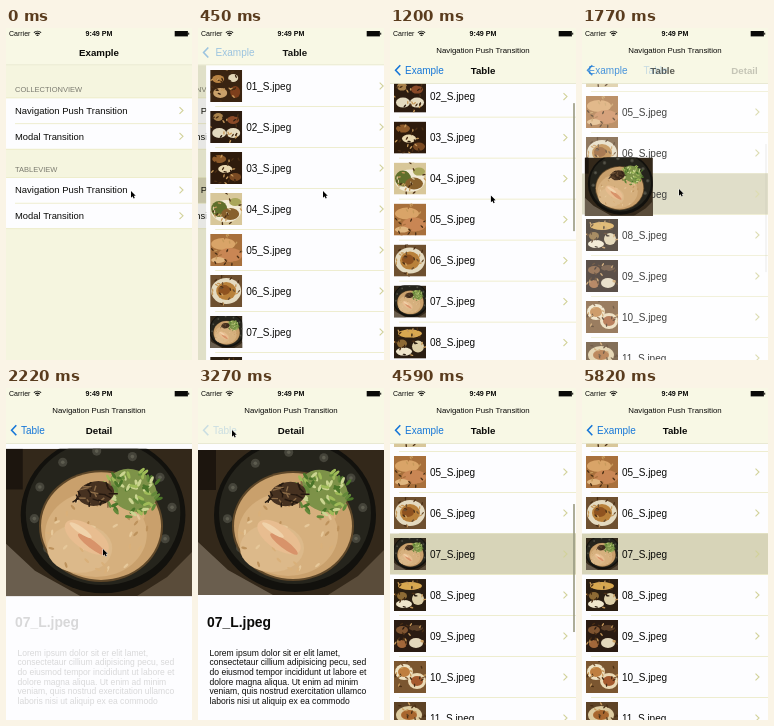
Animation of 186x332 px, one loop 5.85 s. Source, as an HTML page with a canvas:

```html
<!DOCTYPE html>
<html lang="en">
<head>
<meta charset="utf-8">
<title>Zoom transition</title>
<style>
html, body { margin: 0; width: 186px; height: 332px; overflow: hidden; background: #fdfdff; }
canvas { display: block; width: 186px; height: 332px; }
</style>
</head>
<body>
<canvas id="stage"></canvas>
<script>
const W = 186, H = 332, LOOP = 5850;
const canvas = document.getElementById('stage');
const g = canvas.getContext('2d');
const dpr = window.devicePixelRatio || 1;
canvas.width = Math.round(W * dpr);
canvas.height = Math.round(H * dpr);

const SANS = '"Liberation Sans", Arial, sans-serif';
const INK = '#0a0a08', BLUE = '#1677d8', PAPER = '#fdfdff';
const GROUP = '#f5f5df', BAR = '#f8f8e5', LINE = '#ebeac4', CHEVRON = '#d2d29a', SELECTED = '#d7d4b8';
const PITCH = 41, REST = -80;

const clamp = v => Math.max(0, Math.min(1, v));
const mix = (a, b, p) => a + (b - a) * p;
const part = (t, a, b) => clamp((t - a) / (b - a));
const smooth = p => p * p * (3 - 2 * p);
const easeOut = p => 1 - (1 - p) ** 3;

function rect(x, y, w, h, color) {
  g.fillStyle = color;
  g.fillRect(x, y, w, h);
}

function oval(x, y, rx, ry, color, turn = 0) {
  g.fillStyle = color;
  g.beginPath();
  g.ellipse(x, y, rx, ry, turn, 0, Math.PI * 2);
  g.fill();
}

function polygon(points, color) {
  g.fillStyle = color;
  g.beginPath();
  points.forEach(([x, y]) => g.lineTo(x, y));
  g.closePath();
  g.fill();
}

function path(points, color, width) {
  g.strokeStyle = color;
  g.lineWidth = width;
  g.beginPath();
  points.forEach(([x, y]) => g.lineTo(x, y));
  g.stroke();
}

// y is the middle of the capitals
function text(str, x, y, size, color = INK, align = 'left', weight = 'normal') {
  g.font = `${weight} ${size}px ${SANS}`;
  g.textAlign = align;
  g.fillStyle = color;
  g.fillText(str, x, y + size * 0.36);
}

function faded(alpha, draw) {
  if (alpha <= 0.003) return;
  g.save();
  g.globalAlpha *= alpha;
  draw();
  g.restore();
}

function clipped(x, y, w, h, draw) {
  g.save();
  g.beginPath();
  g.rect(x, y, w, h);
  g.clip();
  draw();
  g.restore();
}

function disclosure(y) {
  path([[173.5, y - 3.4], [177, y], [173.5, y + 3.4]], CHEVRON, 1.1);
}

function seeded(seed) {
  return () => (seed = (seed * 16807) % 2147483647) / 2147483647;
}

// ---- pictures ----

// small strokes strewn over an ellipse
function strew(rnd, count, x, y, rx, ry, size, colors) {
  for (let i = 0; i < count; i++) {
    const a = rnd() * 6.28, r = Math.sqrt(rnd());
    oval(x + Math.cos(a) * rx * r, y + Math.sin(a) * ry * r,
      size, size * 0.4, colors[i % colors.length], rnd() * 3);
  }
}

function ramenScene() {
  const rnd = seeded(71);
  rect(0, 0, 186, 145, '#33281a');
  polygon([[0, 92], [30, 120], [75, 145], [0, 145]], '#6a5e4e');
  polygon([[186, 100], [160, 126], [130, 145], [186, 145]], '#5a4c3a');
  rect(0, 0, 18, 40, '#1c150e');
  oval(97, 65, 81, 77, '#12110d');
  oval(97, 63, 76, 71, '#25241c');
  for (let i = 0; i < 9; i++) {
    const a = 2.5 + i * 0.53, x = 97 + Math.cos(a) * 68, y = 62 + Math.sin(a) * 60;
    oval(x, y, 4.5, 4.5, '#45443a');
    oval(x, y, 1.8, 1.8, '#5e5d50');
  }
  oval(95, 76, 61, 55, '#5e4729');
  oval(95, 76, 59, 53, '#c9a06c');
  oval(90, 84, 50, 42, '#d6b07e');
  oval(74, 98, 32, 24, '#dcb98a');
  strew(rnd, 34, 94, 84, 52, 40, 3, ['#e6c89a', '#bd925c', '#d9b07a']);
  oval(81, 87, 25, 12, '#e8bd90', 0.6);
  oval(86, 94, 17, 4, '#d8936a', 0.65);
  oval(75, 80, 13, 3, '#f0d2aa', 0.6);
  oval(126, 41, 25, 20, '#7d9248', 0.5);
  strew(rnd, 64, 126, 42, 28, 26, 3.8, ['#4b7529', '#9fbb58', '#cbd591', '#64893a']);
  oval(90, 44, 18, 12, '#463120', -0.15);
  for (let i = 0; i < 30; i++) {
    const x = 70 + rnd() * 34, y = 31 + rnd() * 25, a = rnd() * 3;
    path([[x, y], [x + Math.cos(a) * 9, y + Math.sin(a) * 5]], i % 3 ? '#24180f' : '#8a6a46', 1.4);
  }
}

function ramen(x, y, w, h) {
  const s = Math.max(w / 186, h / 145);
  clipped(x, y, w, h, () => {
    g.translate(x + w / 2, y + h / 2);
    g.scale(s, s);
    g.translate(-93, -72.5);
    ramenScene();
  });
}

// background, then x, y, rx, ry, colour of each blob
const dishes = {
  1: ['#3a2411', [8, 9, 6, 4, '#b98444'], [23, 8, 5, 4, '#e3d6b6'], [10, 23, 7, 5, '#c9a06a'], [25, 22, 5, 6, '#7e3f1c']],
  2: ['#2c1c10', [8, 6, 5, 4, '#a8824c'], [23, 9, 6, 4, '#8a4a28'], [9, 22, 7, 5, '#e3dac0'], [23, 22, 7, 5, '#e6dcc0']],
  3: ['#2e1b0c', [9, 7, 7, 4, '#8d5a2a'], [15, 17, 7, 4, '#ead9b0'], [25, 25, 6, 4, '#7a4a22']],
  4: ['#d8c79a', [16, 18, 15, 11, '#f2ebd6'], [9, 16, 8, 8, '#5f6f2c'], [20, 21, 9, 6, '#87602c'], [25, 9, 6, 4, '#a9a65a']],
  5: ['#a8703c', [13, 10, 12, 6, '#d9a468'], [20, 21, 12, 7, '#c98654'], [8, 26, 7, 3, '#e0b680']],
  6: ['#6e5030', [16, 16, 15, 13, '#e4dac0'], [16, 16, 10, 9, '#b9813a'], [14, 15, 6, 5, '#8f5320']],
  8: ['#2a1e12', [16, 7, 12, 4, '#d8a850'], [8, 17, 5, 4, '#8d6a35'], [10, 25, 8, 4, '#efe6cc'], [24, 20, 6, 6, '#ddcfa8']],
  9: ['#2a1b12', [8, 10, 6, 4, '#7f5430'], [22, 8, 7, 3, '#5d4028'], [22, 23, 7, 5, '#e4d8bc'], [8, 24, 5, 4, '#a2673a']],
  10: ['#7b5630', [10, 11, 9, 8, '#eee2c3'], [10, 11, 6, 5, '#bf7f3f'], [23, 20, 9, 8, '#ead9b4'], [23, 20, 6, 5, '#a55a2e']],
  11: ['#5e4326', [15, 13, 13, 9, '#ddcba0'], [15, 13, 8, 5, '#a9672f']]
};

function thumb(n, x, y) {
  if (n === 7) return ramen(x, y, 32, 32);
  const [back, ...blobs] = dishes[n];
  clipped(x, y, 32, 32, () => {
    rect(x, y, 32, 32, back);
    blobs.forEach(([bx, by, rx, ry, color]) => oval(x + bx, y + by, rx, ry, color));
    strew(seeded(n * 97), 26, x + 16, y + 16, 17, 17, 1.8, [back, '#4a2e14', '#c79a5c']);
  });
}

// ---- screens ----

function exampleScreen(pressed) {
  rect(0, 0, W, H, GROUP);
  [['COLLECTIONVIEW', 61, 70], ['TABLEVIEW', 141, 149.5]].forEach(([label, y, top], i) => {
    text(label, 9, y, 7.5, '#7b7b70');
    rect(0, top, W, 51, PAPER);
    if (i && pressed) rect(0, top, W, 25.5, SELECTED);
    rect(0, top - 0.5, W, 0.8, LINE);
    rect(9, top + 25.3, W, 0.8, LINE);
    rect(0, top + 50.8, W, 0.8, LINE);
    text('Navigation Push Transition', 9, top + 12.5, 9.45);
    text('Modal Transition', 9, top + 38.3, 9.4);
    disclosure(top + 12.5);
    disclosure(top + 38.3);
  });
}

function tableScreen(first, selected) {
  rect(0, 0, W, H, PAPER);
  for (let n = 1; n <= 11; n++) {
    const y = first + (n - 1) * PITCH;
    if (y < -25 || y > H + 25) continue;
    if (n === 7 && selected) rect(0, y - 20.5, W, PITCH, SELECTED);
    thumb(n, 4, y - 16);
    text(String(n).padStart(2, '0') + '_S.jpeg', 40, y, 10);
    disclosure(y);
    rect(9, y + 20.1, W, 0.8, LINE);
  }
}

function detailText() {
  text('07_L.jpeg', 9, 234, 13.9, INK, 'left', 'bold');
  ['Lorem ipsum dolor sit er elit lamet,',
    'consectetaur cillium adipisicing pecu, sed',
    'do eiusmod tempor incididunt ut labore et',
    'dolore magna aliqua. Ut enim ad minim',
    'veniam, quis nostrud exercitation ullamco',
    'laboris nisi ut aliquip ex ea commodo'
  ].forEach((s, i) => text(s, 11.5, 264.6 + i * 9.7, 8.55));
}

// ---- chrome ----

function statusBar() {
  text('Carrier', 3, 5.8, 7);
  for (const r of [2, 4, 6]) {
    g.strokeStyle = INK;
    g.lineWidth = 1.1;
    g.beginPath();
    g.arc(31.5, 8.6, r - 0.6, -2.3, -0.84);
    g.stroke();
  }
  text('9:49 PM', 93, 5.8, 7.1, INK, 'center', 'bold');
  rect(168.7, 3, 13.2, 5.4, INK);
  rect(182.2, 4.7, 1, 2, INK);
}

// p runs from 0 (title `from`) to 1 (title `to`, back button `from`)
function navBar(from, to, p, prompt, backAlpha, oldBack) {
  const y = mix(24.5, 42.3, prompt), bottom = mix(37.2, 55.6, prompt);
  const backLabel = (label, x) => text(label, x, y - 0.3, 10, BLUE);
  rect(0, 0, W, bottom, BAR);
  rect(0, bottom - 0.6, W, 0.6, '#dedec2');
  statusBar();
  faded(prompt, () => text('Navigation Push Transition', 93, mix(10, 22, prompt), 7.85, INK, 'center'));
  faded(clamp(1 - p * 1.6), () => text(from, mix(93, 34, p), y, 9.7, INK, 'center', 'bold'));
  faded(p, () => text(to, 93 + 88 * (1 - p), y, 9.7, INK, 'center', 'bold'));
  faded(backAlpha, () => backLabel(from, mix(74, 15, p)));
  if (oldBack) faded(1 - p, () => backLabel(oldBack, 15 - 40 * p));
  faded(oldBack ? Math.max(1 - p, backAlpha) : backAlpha, () =>
    path([[10.3, y - 5], [5.6, y], [10.3, y + 5]], BLUE, 1.6));
}

function pointer(x, y) {
  g.save();
  g.translate(x, y);
  g.scale(0.88, 0.88);
  g.beginPath();
  [[0, 0], [0, 7.6], [1.8, 6], [3, 8.6], [4.3, 8], [3.1, 5.5], [5.4, 5.4]]
    .forEach(([dx, dy]) => g.lineTo(dx, dy));
  g.closePath();
  g.strokeStyle = '#fff';
  g.lineWidth = 0.9;
  g.stroke();
  g.fillStyle = '#000';
  g.fill();
  g.restore();
}

// ---- motion ----

const promptAt = t => smooth(part(t, 620, 880));

// centre of the first table row: prompt inset, drag, then coasting
function firstRow(t) {
  if (t < 930) return 58 + 18 * promptAt(t);
  if (t < 1330) return 76 - 96 * ((t - 930) / 400) ** 1.76;
  return t < 1720 ? REST + 60 * Math.exp((1330 - t) / 110) : REST;
}

const approach = [[0, 125, 163], [560, 125, 163], [910, 108, 216], [930, 107, 216]];
const leave = [[1330, 98, 120], [1650, 97, 161], [2500, 97, 161],
  [3130, 34, 42], [3450, 34, 42], [4150, -12, 30]];

function along(stops, t) {
  const i = stops.findIndex(s => t <= s[0]);
  if (i < 0) return stops[stops.length - 1].slice(1);
  if (i === 0) return stops[0].slice(1);
  const [t0, x0, y0] = stops[i - 1], [t1, x1, y1] = stops[i];
  const p = smooth(part(t, t0, t1));
  return [mix(x0, x1, p), mix(y0, y1, p)];
}

function pointerAt(t) {
  if (t < 930) return along(approach, t);
  if (t < 1330) return [mix(107, 98, part(t, 930, 1330)), 140 + firstRow(t)];
  return along(leave, t);
}

function scrollMark(t, first) {
  const alpha = t < 3000
    ? part(t, 930, 1000) * (1 - part(t, 1600, 1800))
    : part(t, 3950, 4050) * (1 - part(t, 4750, 5050));
  faded(alpha, () => rect(183.2, 75 + (28 - first) * 0.38, 1.6, 128, '#9a9a80'));
}

function zoomed(p, scale) {
  const y7 = REST + 6 * PITCH;
  const w = mix(32, W, p) * scale, h = mix(32, 145, p) * scale;
  ramen(mix(20, 93, p) - w / 2, mix(y7, 134.5, p) - h / 2, w, h);
}

function pushTable(t) {
  const s = Math.max(0, t - 120) / 1000 * 14.8;
  const p = t > 660 ? 1 : 1 - (1 + s) * Math.exp(-s);
  const left = W * (1 - p);
  g.save();
  g.translate(-56 * p, 0);
  exampleScreen(t > 50);
  g.restore();
  rect(0, 0, left, H, `rgba(60,60,20,${0.12 * p})`);
  g.save();
  g.translate(left, 0);
  tableScreen(firstRow(t), false);
  g.restore();
  navBar('Example', 'Table', p, promptAt(t), part(t, 300, 670));
}

function zoomDetail(t) {
  const popping = t >= 3340;
  const back = 1 - smooth(part(t, 3340, 3800));
  const settle = smooth(part(t, 2130, 2500));
  const p = popping ? back : easeOut(part(t, 1740, 2110));
  const bar = popping ? back : easeOut(part(t, 1740, 2150));
  const press = 1 - 0.8 * part(t, 3200, 3250);
  faded(p, () => rect(0, 0, W, H, PAPER));
  faded(popping ? 1 - part(t, 3340, 3520) : settle, detailText);
  zoomed(p, popping ? 1 : mix(1, 1.02, p) - 0.02 * settle);
  navBar('Table', 'Detail', bar, 1, bar * press, 'Example');
}

function frame(t) {
  if (t < 700) {
    pushTable(t);
  } else {
    const first = firstRow(t);
    tableScreen(first, t > 1690);
    scrollMark(t, first);
    if (t > 1740 && t < 3800) zoomDetail(t);
    else navBar('Example', 'Table', 1, promptAt(t), 1);
  }
  const [x, y] = pointerAt(t);
  if (x > -8) pointer(x, y);
}

const start = performance.now();
function tick() {
  g.setTransform(dpr, 0, 0, dpr, 0, 0);
  frame((performance.now() - start) % LOOP);
  requestAnimationFrame(tick);
}
tick();
</script>
</body>
</html>
```
